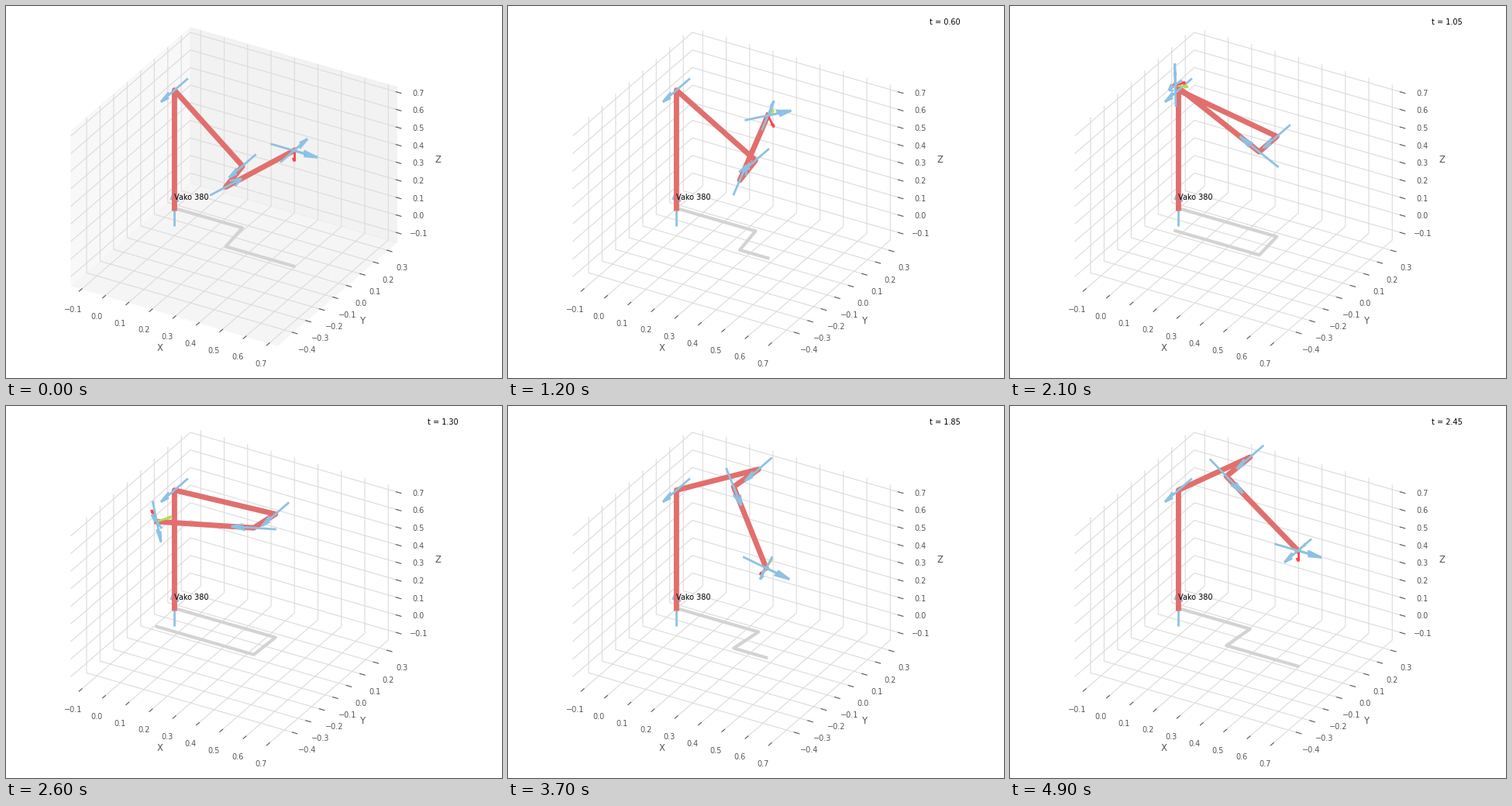
Write a matplotlib script that moves like this. It is 640 px wide and 480 px high and loops after 5 s.

```python
import numpy as np
import matplotlib.pyplot as plt
from matplotlib.animation import FuncAnimation

FRAMES, INTERVAL = 50, 100
TIME_STEP = 0.05

plt.rcParams.update({
    "font.family": "DejaVu Sans",
    "font.size": 7,
    "lines.linewidth": 0.5,
    "patch.linewidth": 0.5,
    "axes.linewidth": 1,
    "axes.edgecolor": "white",
    "axes.facecolor": "white",
    "axes.labelcolor": "#555555",
    "axes.labelsize": "large",
    "axes.labelpad": 1,
    "axes.axisbelow": True,
    "xtick.color": "#555555",
    "ytick.color": "#555555",
    "grid.color": "#dbdbdb",
    "grid.linestyle": "-",
})

# Arm geometry: one (d, a, alpha) row per revolute joint
COLUMN, ARM, OFFSET, ELBOW = 0.67183, 0.4318, 0.15005, 0.0203
LINKS = [
    (COLUMN, 0, np.pi / 2),
    (0, ARM, 0),
    (OFFSET, ELBOW, -np.pi / 2),
    (ARM, 0, np.pi / 2),
    (0, 0, -np.pi / 2),
    (0, 0, 0),
]

ROBOT = dict(color="#E16F6D", linewidth=5)
SHADOW = dict(color="lightgrey", linewidth=3)
JOINT_AXIS = dict(color="#8FC1E2", linewidth=2)
TOOL_AXES = [dict(color=c, linewidth=2) for c in ("#F84752", "#BADA55", "#54AEFF")]
JOINT_AXIS_LENGTH, TOOL_AXIS_LENGTH = 0.2, 0.06


def elbow_down(q_up):
    """Mirror an elbow-up pose to the elbow-down, wrist-flipped one."""
    pitch = q_up[1] + q_up[2]
    x = ARM * np.cos(q_up[1]) + ELBOW * np.cos(pitch) - ARM * np.sin(pitch)
    z = ARM * np.sin(q_up[1]) + ELBOW * np.sin(pitch) + ARM * np.cos(pitch)
    q2 = 2 * np.arctan2(z, x) - q_up[1]
    q3 = 2 * np.pi - q_up[2] - 2 * np.arctan2(ARM, ELBOW)
    q5 = q2 + q3 + np.pi / 2
    return np.array([0, q2, q3, -np.pi, q5, np.pi])


Q_END = np.array([0, np.pi / 4, np.pi, 0, np.pi / 4, 0])
Q_START = elbow_down(Q_END)


def joint_angles(frame):
    s = frame / (FRAMES - 1)
    return Q_START + (Q_END - Q_START) * s**3 * (10 - 15 * s + 6 * s**2)


def link_transform(theta, d, a, alpha):
    ct, st, ca, sa = np.cos(theta), np.sin(theta), np.cos(alpha), np.sin(alpha)
    return np.array([
        [ct, -st * ca, st * sa, a * ct],
        [st, ct * ca, -ct * sa, a * st],
        [0, sa, ca, d],
        [0, 0, 0, 1],
    ])


def forward(q):
    poses = [np.eye(4)]
    for theta, link in zip(q, LINKS):
        poses.append(poses[-1] @ link_transform(theta, *link))
    return poses


fig = plt.figure(figsize=(6.4, 4.8), dpi=100)
fig.subplots_adjust(left=-0.09, bottom=0, top=1, right=0.99)
ax = fig.add_subplot(111, projection="3d", proj_type="ortho")
ax.set(xlabel="X", ylabel="Y", zlabel="Z")
ax.set_xticks(np.arange(-1, 8) / 10)
ax.set_yticks(np.arange(-4, 4) / 10)
ax.set_zticks(np.arange(-1, 8) / 10)

HALF_RANGE = 0.4422
for set_lim, center in ((ax.set_xlim, 0.2982), (ax.set_ylim, -0.075), (ax.set_zlim, 0.2859)):
    set_lim(center - HALF_RANGE, center + HALF_RANGE)

shadow, = ax.plot([], [], [], **SHADOW)
robot, = ax.plot([], [], [], **ROBOT)
ax.text(0, 0, 0.05, "Vako 380", color="black")
timer = fig.text(0.85, 0.95, "", color="black")
arrows = []


def add_arrow(start, vector, style):
    arrows.append(ax.quiver(*start, *vector, **style))


def update(frame):
    poses = forward(joint_angles(frame))
    x, y, z = np.array([pose[:3, 3] for pose in poses[:5]]).T
    shadow.set_data_3d(x, y, np.zeros_like(z))
    robot.set_data_3d(x, y, z)

    while arrows:
        arrows.pop().remove()
    tool = poses[-1]
    for i, style in enumerate(TOOL_AXES):
        add_arrow(tool[:3, 3], TOOL_AXIS_LENGTH * tool[:3, i], style)
    for pose in poses[:-1]:
        vector = JOINT_AXIS_LENGTH * pose[:3, 2]
        add_arrow(pose[:3, 3] - vector / 2, vector, JOINT_AXIS)

    # The shaded walls and the missing clock belong to the opening pose only
    for axis in (ax.xaxis, ax.yaxis, ax.zaxis):
        axis.pane.set_visible(frame == 0)
    timer.set_text(f"t = {frame * TIME_STEP:.2f}" if frame else "")
    return shadow, robot, timer, *arrows


anim = FuncAnimation(fig, update, frames=FRAMES, interval=INTERVAL, repeat=True)
plt.show()
```
